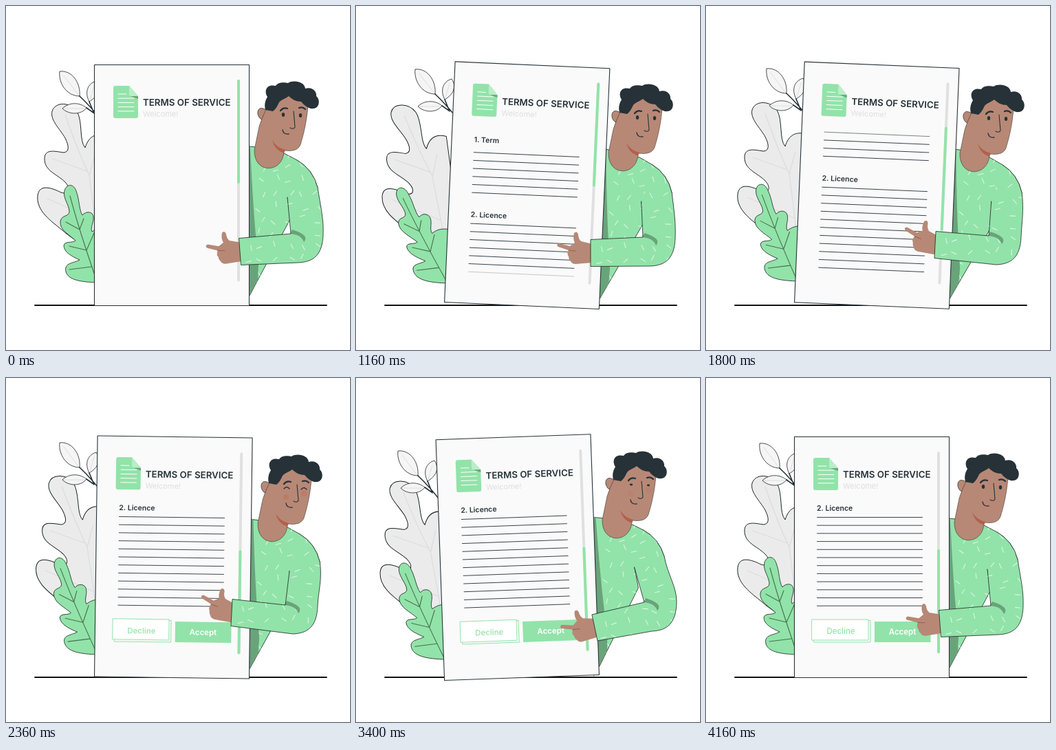
An HTML page with a canvas for the animation above (4240 ms loop, 500 by 500 pixels).

```html
<!DOCTYPE html>
<html lang="en">
<head>
<meta charset="utf-8">
<title>Terms of service</title>
<style>
html, body { margin: 0; width: 100%; height: 100%; overflow: hidden; background: #fff; }
canvas { display: block; }
</style>
</head>
<body>
<canvas id="stage" width="500" height="500"></canvas>
<script>
const c = document.getElementById('stage').getContext('2d');
const LOOP = 4240, STEP = 40;
const INK = '#263238', GREEN = '#92e3a9', SHADE = '#69a37a', SKIN = '#b78876', EDGE = '#1c2421';
const rad = d => d * Math.PI / 180;
const clamp = v => Math.max(0, Math.min(1, v));
const ease = v => (1 - Math.cos(Math.PI * clamp(v))) / 2;

// Pose keys, joined by smooth cubic curves
const TIMES = [0, 640, 1160, 1800, 2360, 2880, 3400, 4160];
const TRACKS = {
  paper: [0, 1.27, 2.54, 2.4, .75, -1.1, -2.05, 0],
  body: [0, 1.1, 2.1, 2.1, 1.1, -.5, -1.6, 0],
  bodyY: [0, 1.5, 4, 4, 1.5, 0, -1.5, 0],
  headX: [0, 4, 6, 8, 5, 0, -3, 0],
  headY: [0, 2, 4, 5, 2, -1, -3, 0],
  elbowX: [0, 2, 3, -3, -8, -2, 5, 0],
  elbowY: [0, 2, 5, 3, -1, -3, -5, 0],
  cuffX: [340, 341, 341, 333, 328, 337, 347, 340],
  cuffY: [357, 359, 359, 347, 341, 352, 363, 357],
  cuff: [-4.4, -3, 0, 3, 3, -4, -12, -4.4],
  hand: [-4.4, -4.6, 0, 15, 15, 2, -12, -4.4],
  grey: [0, -2.8, -3.7, 0, -1.1, -3, -3.2, 0],
  leaf: [0, -9, -11.3, -5.3, -6.4, -9, -8, 0],
  plantX: [0, 0, 0, 0, 0, -2, -4, 0],
  plantY: [0, 1, 1, -2, 0, 3, 7, 0],
  twigX: [0, 2, 8, 10, 0, -10, -17, 0],
  twigY: [0, -1, -3, -4, -1, 5, 11, 0]
};

function sample(v, t) {
  const last = TIMES.length - 1;
  if (t >= TIMES[last]) return v[last];
  const i = TIMES.findIndex((k, n) => t < TIMES[n + 1]);
  const slope = n => n < 1 || n >= last ? 0 : (v[n + 1] - v[n - 1]) / (TIMES[n + 1] - TIMES[n - 1]);
  const h = TIMES[i + 1] - TIMES[i], u = (t - TIMES[i]) / h, u2 = u * u, u3 = u2 * u;
  return v[i] * (2 * u3 - 3 * u2 + 1) + v[i + 1] * (3 * u2 - 2 * u3) +
    h * (slope(i) * (u3 - 2 * u2 + u) + slope(i + 1) * (u3 - u2));
}

const shape = d => new Path2D(d);
const ART = {
  grey: shape('M128 360C110 345 95 338 82 326C65 312 44 298 46 276C48 258 66 264 80 271C92 275 95 266 86 256C74 244 56 240 56 222C56 206 74 212 84 213C92 212 92 204 86 192C78 178 64 166 67 153C72 138 94 140 103 153C112 168 106 196 115 206C120 190 130 184 145 188L160 400Z'),
  greyVeins: shape('M86 158Q102 205 121 246L138 380M118 240L68 222M121 246L130 214M128 310L60 280'),
  leaf: shape('M140 402C112 402 90 399 87 386C84 373 98 374 107 369C96 364 84 358 84 348C86 341 96 345 101 341C92 332 78 326 79 313C81 303 91 307 92 299C92 289 82 279 85 268C89 257 99 259 102 269C107 282 106 296 111 304C116 298 126 298 127 306C128 314 122 322 125 328C131 324 138 320 150 322Z'),
  leafVeins: shape('M93 276Q106 325 132 400M107 325L87 314M107 325L113 309M117 355L92 349M117 355L128 330M124 379L92 383'),
  twigLeaves: shape('M107 131C88 131 76 112 78 95C96 93 109 112 107 131ZM121 139C114 126 118 113 131 109C139 121 133 132 121 139ZM117 148C109 159 91 158 82 149C92 139 108 140 117 148Z'),
  twigStem: shape('M140 168Q125 148 107 131M127 155L117 148M128 156L121 139'),
  twigVeins: shape('M105 129L84 101M84 149H113M122 136L128 116'),
  torso: shape('M345 203L362 205L404 214L423 224Q446 237 453 264L440 300L409 278L414 308L354 421L345 430Z'),
  torsoShade: shape('M345 203L355 204Q359 300 367 376L366 398L345 436Z'),
  face: shape('M386 128C382 145 373 158 368 175L361 209C360 246 404 243 404 210C420 212 427 208 429 198C433 185 437 168 439 145L425 122Z'),
  ear: shape('M379 152C371 145 365 149 366 157C368 165 373 167 378 164Z'),
  neckShade: shape('M387 195Q393 206 406 209L404 214Q390 209 387 195Z'),
  hair: shape('M377 151C375 143 377 137 380 132C374 122 380 113 392 116C396 110 405 111 410 112C418 107 434 110 435 120C445 117 452 124 451 131C457 136 456 148 447 149C440 150 434 145 429 139C422 139 416 136 411 131C406 135 400 136 397 140C394 146 392 150 388 153Z'),
  nose: shape('M418 153L420 176Q418 180 413 177'),
  mouth: shape('M402 180Q403 187 411 186'),
  brows: shape('M399 152Q403 147 409 149M426 148Q431 146 435 150'),
  hand: shape('M3 -13L-14 -17Q-18 -21 -18 -27Q-20 -33 -24 -29Q-26 -21 -23 -15L-30 -10L-46 -14Q-51 -12 -47 -9L-32 -4Q-35 2 -32 5Q-32 9 -29 12Q-27 16 -22 16L3 14Z'),
  fingers: shape('M-32 -4L-22 -3'),
  icon: shape('M156 119q0-3 3-3H179L192 131V160q0 3-3 3H159q-3 0-3-3Z'),
  iconFold: shape('M179 116L192 131H182q-3 0-3-3Z'),
  iconShade: shape('M181 131H192V135Z')
};

function fill(path, color) { c.fillStyle = color; c.fill(path); }
function stroke(path, color, width = 1) {
  c.strokeStyle = color;
  c.lineWidth = width;
  c.stroke(path);
}
function at(x, y, deg, px, py, draw) {
  c.save();
  c.translate(x + px, y + py);
  c.rotate(rad(deg));
  c.translate(-px, -py);
  draw();
  c.restore();
}
// Leans a plant sideways while its foot stays in place
function sway(p, deg, draw) {
  c.save();
  c.translate(128 + p.plantX, 400 + p.plantY);
  c.transform(1, 0, -Math.tan(rad(deg)), Math.cos(rad(deg)), 0, 0);
  c.translate(-128, -400);
  draw();
  c.restore();
}
function line(x1, y1, x2, y2, color, width) {
  c.beginPath();
  c.moveTo(x1, y1);
  c.lineTo(x2, y2);
  c.strokeStyle = color;
  c.lineWidth = width;
  c.stroke();
}
function text(s, x, y, size, weight, color, align = 'left') {
  c.font = `${weight} ${size}px Inter, sans-serif`;
  c.textAlign = align;
  c.fillStyle = color;
  c.fillText(s, x, y);
}

// Scattered dashes of the sweater
const dashes = new Path2D();
let seed = 7;
const random = () => (seed = seed * 16807 % 2147483647) / 2147483647;
for (let y = 210; y < 430; y += 19) {
  for (let x = 345; x < 475; x += 20) {
    const px = x + random() * 12, py = y + random() * 11, a = random() * Math.PI;
    const dx = Math.cos(a) * 3.8, dy = Math.sin(a) * 3.8;
    dashes.moveTo(px - dx, py - dy);
    dashes.lineTo(px + dx, py + dy);
  }
}
function sprinkle(clip, dx, dy) {
  c.save();
  c.clip(clip);
  c.translate(dx, dy);
  stroke(dashes, '#d9f6e0', 1.1);
  c.restore();
}

function drawPlants(p) {
  sway(p, p.grey, () => {
    fill(ART.grey, '#ebebeb');
    stroke(ART.greyVeins, '#dcdcdc', 1.2);
    stroke(ART.grey, EDGE);
  });
  at(p.twigX, p.twigY, 0, 0, 0, () => {
    fill(ART.twigLeaves, '#f5f5f5');
    stroke(ART.twigVeins, '#dedede');
    stroke(ART.twigLeaves, EDGE, .8);
    stroke(ART.twigStem, INK, 1.6);
  });
  sway(p, p.leaf, () => {
    fill(ART.leaf, GREEN);
    stroke(ART.leaf, EDGE, .8);
    stroke(ART.leafVeins, '#47704f', 1.1);
  });
}

function drawEye(x, y, shut) {
  c.beginPath();
  if (shut > .65) {
    c.moveTo(x - 4, y + 1);
    c.quadraticCurveTo(x, y - 4, x + 4, y + 1);
    c.strokeStyle = INK;
    c.lineWidth = 1.3;
    c.stroke();
  } else {
    c.ellipse(x, y, 2.2, 2.9 * (1 - shut), 0, 0, 7);
    c.fillStyle = INK;
    c.fill();
  }
}

function drawPerson(p, t) {
  at(0, p.bodyY, p.body, 354, 435, () => {
    fill(ART.torso, GREEN);
    stroke(ART.torso, EDGE, .8);
    sprinkle(ART.torso, 0, 0);
    fill(ART.torsoShade, SHADE);
  });
  at(p.headX, p.headY, 0, 0, 0, () => {
    const blink = (mid, reach) => clamp((reach - Math.abs(t - mid)) / 80);
    const shut = Math.max(blink(640, 160), blink(2360, 160), blink(3460, 100));
    fill(ART.ear, SKIN);
    stroke(ART.ear, EDGE, .7);
    fill(ART.face, SKIN);
    stroke(ART.face, EDGE, .5);
    fill(ART.neckShade, '#b2604c');
    c.globalAlpha = .25 * shut;
    for (const [x, y] of [[402, 171], [428, 166]]) {
      c.beginPath();
      c.arc(x, y, 4, 0, 7);
      c.fillStyle = '#c9583f';
      c.fill();
    }
    c.globalAlpha = 1;
    fill(ART.hair, INK);
    drawEye(403, 158, shut);
    drawEye(428, 159, shut);
    stroke(ART.brows, INK, 2.3);
    stroke(ART.nose, INK, 1.1);
    stroke(ART.mouth, INK, 1.4);
  });
}

// Scrolled items appear one by one and fade at the edges of the view
function drawContent(t, scroll) {
  const item = (y, start, draw) => {
    const top = y - 117 * scroll;
    c.globalAlpha = clamp((t - start) / 60) * clamp((top - 183) / 5) * clamp((402 - top) / 16);
    if (c.globalAlpha > 0) draw(top);
    c.globalAlpha = 1;
  };
  const heading = (s, y, start) => item(y, start, top => text(s, 161, top + 4, 10.5, 600, INK));
  const rows = (n, y, start, gap) => {
    for (let i = 0; i < n; i++) {
      item(y + i * 11.7, start + i * gap, top => line(161.5, top, 314.5, top, INK, .9));
    }
  };
  heading('1. Term', 197, 40);
  rows(6, 216, 90, 35);
  heading('2. Licence', 306, 300);
  rows(12, 319.5, 310, 138);
  item(485, 1300, top => {
    c.strokeStyle = GREEN;
    c.lineWidth = 1;
    c.strokeRect(156.5, top - 15.5, 82.5, 31.5);
    c.fillStyle = '#fff';
    c.fillRect(154, top - 17, 82, 30);
    c.strokeRect(154, top - 17, 82, 30);
    text('Decline', 196, top + 4, 11.5, 500, GREEN, 'center');
    c.fillStyle = GREEN;
    c.fillRect(245, top - 14, 81.5, 30);
    text('Accept', 285.5, top + 5, 11.5, 600, '#fff', 'center');
  });
}

function drawPaper(p, t) {
  const scroll = ease((t - 1480) / 680);
  at(0, 0, p.paper, 241, 435, () => {
    c.fillStyle = '#fafafa';
    c.fillRect(128.5, 85.5, 225, 350);
    c.strokeStyle = INK;
    c.lineWidth = 1.1;
    c.strokeRect(128.5, 85.5, 225, 350);
    fill(ART.icon, GREEN);
    fill(ART.iconShade, SHADE);
    fill(ART.iconFold, '#b9eec7');
    for (let i = 0; i < 5; i++) line(163, 128 + i * 6.2, i ? 186 : 175, 128 + i * 6.2, '#fff', 1);
    text('TERMS OF SERVICE', 199, 145, 13.3, 600, INK);
    text('Welcome!', 199, 161, 11, 400, '#dedede');
    line(338, 109, 338, 398.5, '#e0e0e0', 4);
    line(338, 109 + 142 * scroll, 338, 256 + 142 * scroll, GREEN, 4);
    drawContent(t, scroll);
  });
}

function drawArm(p) {
  const spin = (x, y, deg) => {
    const s = Math.sin(rad(deg)), k = Math.cos(rad(deg));
    return [x * k - y * s, x * s + y * k];
  };
  const body = (x, y) => {
    const [dx, dy] = spin(x - 354, y - 435, p.body);
    return [354 + dx, 435 + p.bodyY + dy];
  };
  const elbow = (x, y) => [x + p.elbowX, y + p.elbowY];
  const cuff = y => {
    const [dx, dy] = spin(0, y, p.cuff);
    return [p.cuffX + dx, p.cuffY + dy];
  };

  at(p.cuffX, p.cuffY, p.hand, 0, 0, () => {
    fill(ART.hand, SKIN);
    stroke(ART.fingers, '#8b5f50', .9);
  });

  const arm = new Path2D();
  arm.moveTo(...body(423, 224));
  arm.quadraticCurveTo(...body(446, 237), ...body(453, 264));
  arm.bezierCurveTo(...body(457, 290), ...elbow(462, 310), ...elbow(461, 332));
  arm.bezierCurveTo(...elbow(460, 362), ...elbow(447, 372), ...elbow(425, 373));
  arm.lineTo(...cuff(19.5));
  arm.lineTo(...cuff(-19.5));
  arm.lineTo(...elbow(414, 331));
  arm.lineTo(...body(409, 278));
  fill(arm, GREEN);
  sprinkle(arm, p.cuffX - 340, p.cuffY - 357);

  const crease = new Path2D();
  crease.moveTo(...elbow(413, 331));
  crease.quadraticCurveTo(...elbow(429, 332), ...elbow(433, 343));
  crease.quadraticCurveTo(...elbow(442, 333), ...elbow(416, 325));
  fill(crease, SHADE);
  stroke(arm, EDGE, .8);
}

function draw(t) {
  const p = {};
  for (const name in TRACKS) p[name] = sample(TRACKS[name], t);
  c.fillStyle = '#fff';
  c.fillRect(0, 0, 500, 500);
  c.lineJoin = c.lineCap = 'round';
  drawPlants(p);
  line(42, 435, 466, 435, '#111', 1.8);
  drawPerson(p, t);
  drawPaper(p, t);
  drawArm(p);
}

function tick() {
  const t = performance.now() % LOOP;
  draw(Math.min(Math.floor(t / STEP) * STEP, 4160));
  requestAnimationFrame(tick);
}
tick();
</script>
</body>
</html>
```
